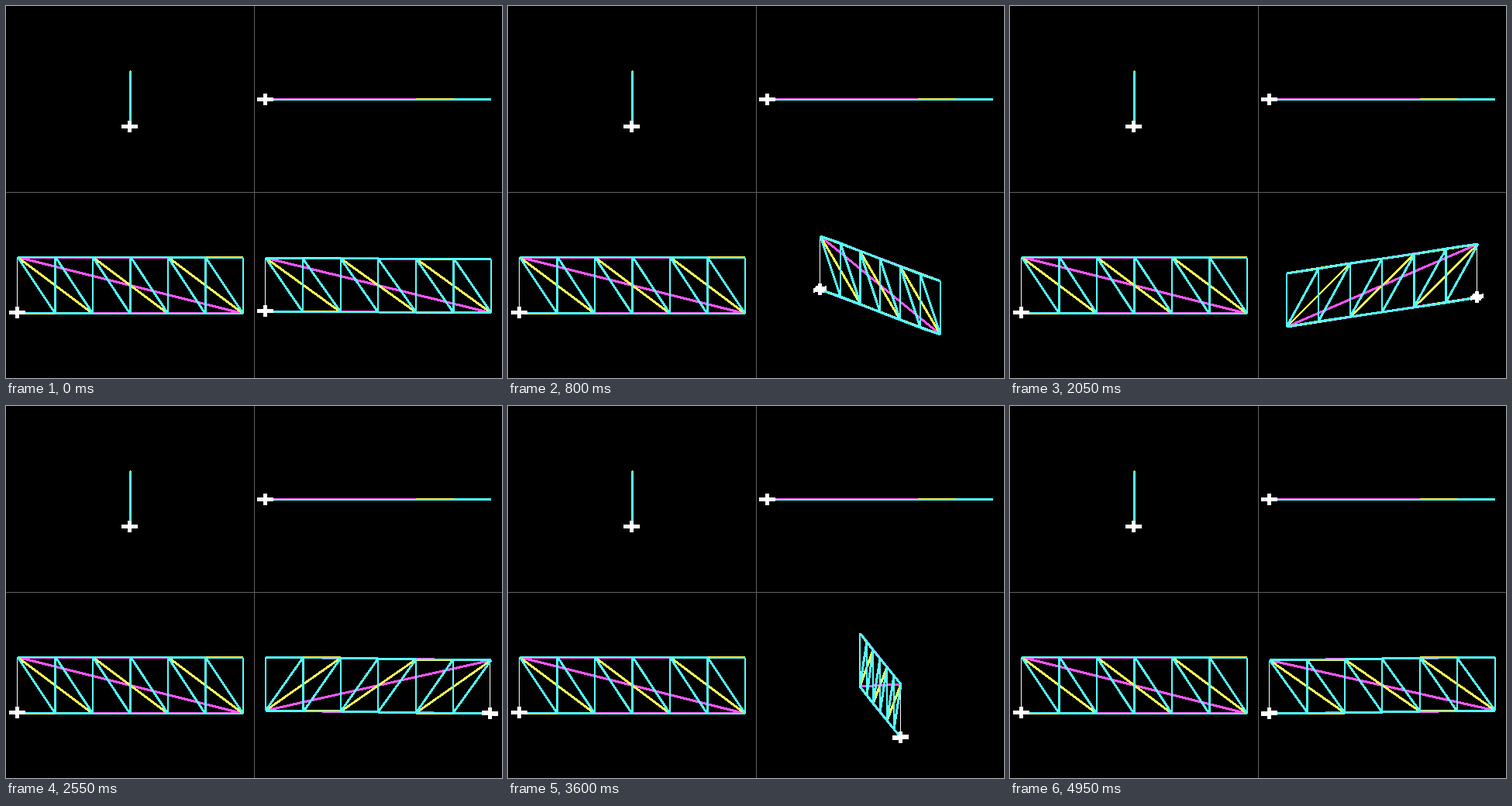
Animation, 640 px wide and 480 px high, one loop 5000 ms. Source, as a matplotlib script:

```python
import numpy as np
import matplotlib.pyplot as plt
from matplotlib.animation import FuncAnimation
from matplotlib.collections import PolyCollection

W, H, DPI = 640, 480, 80
FRAMES, INTERVAL = 100, 50
CYAN, YELLOW, MAGENTA = "#55ffff", "#ffff55", "#ff55ff"
BAYS = 6
TILT = 0.235        # how much depth shows as height in the turning view
LAYERS = ((6, MAGENTA), (2, YELLOW), (1, CYAN))

fig = plt.figure(figsize=(W / DPI, H / DPI), dpi=DPI, facecolor="black")
ax = fig.add_axes([0, 0, 1, 1])
ax.set(xlim=(0, W), ylim=(H, 0))
ax.axis("off")


def strip(p, q, width):
    """Raster-style line: its width is measured along the minor axis."""
    p, q = np.asarray(p, float), np.asarray(q, float)
    dx, dy = abs(q - p)
    off = np.array([0, width / 2] if dx >= dy else [width / 2, 0])
    return [p - off, q - off, q + off, p + off]


class Lines:
    def __init__(self, color, width, segs=()):
        self.width = width
        self.coll = PolyCollection([], facecolors=color, edgecolors="none",
                                   linewidths=0, antialiaseds=False)
        self.coll.set_snap(False)
        ax.add_collection(self.coll)
        self.set(segs)

    def set(self, segs):
        self.coll.set_verts([strip(p, q, self.width) for p, q in segs])


def truss_lines(top, bottom, step):
    """Chords, posts and diagonals that each span a number of bays."""
    segs = []
    for a in range(0, BAYS, step):
        b = a + step
        segs += [(top[a], top[b]), (bottom[a], bottom[b]),
                 (top[b], bottom[b]), (top[a], bottom[b])]
    return segs


class Truss:
    def __init__(self):
        self.post = Lines("white", 1)
        self.layers = [(step, Lines(color, 2)) for step, color in LAYERS]
        self.cross = Lines("white", 5)

    def place(self, top, bottom, arms):
        top, bottom = np.round(top), np.round(bottom)
        origin = bottom[0] - 0.5
        self.post.set([((origin[0], top[0][1]), origin)])
        for step, layer in self.layers:
            layer.set(truss_lines(top, bottom, step))
        self.cross.set([(origin - arm, origin + arm) for arm in arms])


node = np.arange(BAYS + 1)
sag = node / BAYS
span = 48.5 * node
flat_arms = np.array([(10, 0), (0, 7.5)])

# Pane dividers
Lines("#606060", 1, [((320.5, 0), (320.5, H)), ((0, 240.5), (W, 240.5))])

# End view
side = 159.6 + sag
Truss().place(np.c_[side, 83.7 + sag], np.c_[side, 156.25 + sag / 5],
              flat_arms)

# Plan view
plan = np.c_[335.1 + span, 121.4 - sag]
Truss().place(plan, plan, flat_arms)

# Front view
Truss().place(np.c_[15.1 + span, 323.7 + sag],
              np.c_[14.9 + span, 396.25 + sag], flat_arms)

# Turning view
turning = Truss()


def draw(i):
    angle = 2 * np.pi * i / FRAMES
    c, s = np.cos(angle), np.sin(angle)

    def project(reach, level):
        along = reach * (2 * sag - 1)
        depth = sag - 0.5
        return np.c_[480.4 + along * c - depth * s,
                     level + depth + (along * s + depth * c) * TILT]

    arms = np.array([(10 * c, 10 * s * TILT), (-10 * s, 10 * c * TILT),
                     (0, 7.2)])
    turning.place(project(145.8, 326), project(145.4, 395), arms)
    return []


anim = FuncAnimation(fig, draw, frames=FRAMES, interval=INTERVAL,
                     repeat=True, repeat_delay=0, blit=False)
plt.show()
```
